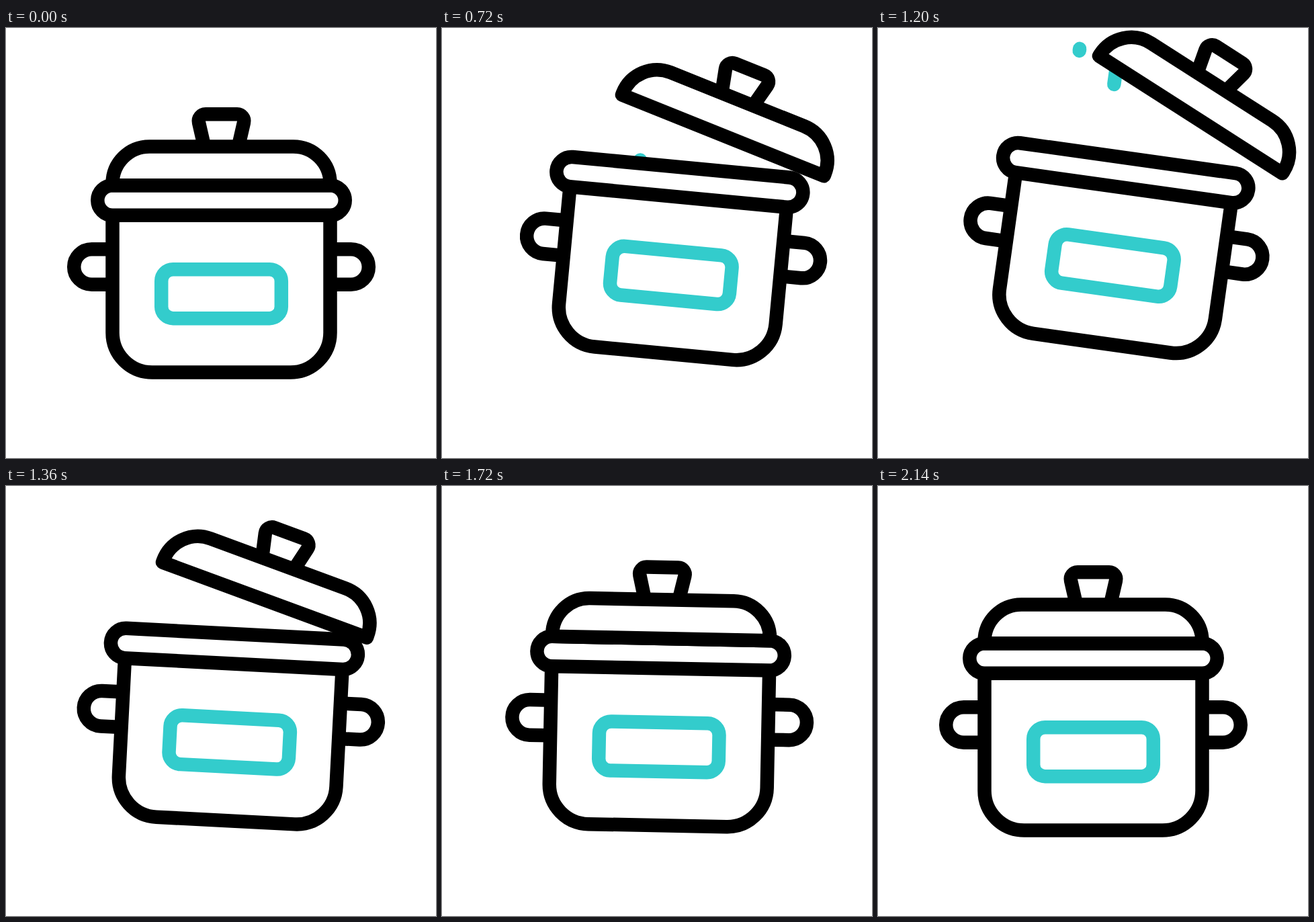
Recreate the animation shown at these times as an HTML page. Size 640x640 px, loop 2.26 s.

```html
<!DOCTYPE html>
<html lang="en">
<head>
<meta charset="utf-8">
<title>Cooking pot</title>
<style>
  html, body { margin: 0; width: 100%; height: 100%; overflow: hidden; background: #fff; }
  svg { display: block; width: 100vw; height: 100vh; }
  .line { fill: #fff; stroke: #000; stroke-width: 20.5; stroke-linejoin: round; }
  .teal { stroke: #3cc; }
  .steam { fill: none; stroke-linecap: round; }
</style>
</head>
<body>
<svg viewBox="0 0 640 640">
  <g id="pot">
    <path class="line teal steam" pathLength="1" d="M259 257V235C259 175 227 185 227 125V83"/>
    <path class="line teal steam" pathLength="1" d="M317 257V235C317 175 285 185 285 125V83"/>
    <path class="line" d="M158.5 329.2H127.5a26.3 26.3 0 0 0 0 52.6H158.5"/>
    <path class="line" d="M482.5 329.2H513.5a26.3 26.3 0 0 1 0 52.6H482.5"/>
    <path class="line" d="M158.5 279V453.5a59 59 0 0 0 59 59H423.5a59 59 0 0 0 59-59V279"/>
    <rect class="line" x="136.3" y="234.3" width="368.4" height="44.4" rx="22.2"/>
    <rect class="line teal" x="231.2" y="359.2" width="178.6" height="73" rx="17.5"/>
    <g id="lid">
      <path class="line" d="M295.2 176.5L287 140.8A10.25 10.25 0 0 1 297 128.3H344A10.25 10.25 0 0 1 354 140.8L345.8 176.5"/>
      <path class="line" d="M158.5 234.3V231.5a55 55 0 0 1 55-55H427.5a55 55 0 0 1 55 55V234.3Z"/>
    </g>
  </g>
</svg>
<script>
  const LOOP = 2260, STEP = 20;
  const pot = document.getElementById('pot');
  const lid = document.getElementById('lid');
  const steams = document.querySelectorAll('.steam');

  const progress = (t, from, to) => Math.min(1, Math.max(0, (t - from) / (to - from)));
  const smooth = x => x * x * (3 - 2 * x);

  // Quick departure with a long, soft arrival: cubic-bezier(.17, 0, .08, 1)
  function soften(x) {
    let low = 0, high = 1;
    for (let i = 0; i < 30; i++) {
      const s = (low + high) / 2, r = 1 - s;
      if (3 * r * r * s * 0.17 + 3 * r * s * s * 0.08 + s * s * s < x) low = s;
      else high = s;
    }
    return smooth(low);
  }

  // Each pose: time, angle, x, y, easing used to reach it
  const poses = [
    [200, 0, 0, 0, smooth],
    [430, -1.87, -5.3, 12.4, smooth],
    [1220, 7.97, 34.5, -41.8, soften],
    [1497, -1.87, -5.3, 12.4, smooth],
    [1816, 1.95, 5.5, -12.8, smooth],
    [2136, 0, 0, 0, smooth]
  ];

  function poseAt(t) {
    let next = poses.findIndex(p => p[0] > t);
    if (next === 0) next = 1;
    if (next < 0) next = poses.length - 1;
    const a = poses[next - 1], b = poses[next];
    const k = b[4](progress(t, a[0], b[0]));
    return [1, 2, 3].map(i => a[i] + (b[i] - a[i]) * k);
  }

  const openness = (t, opens, opened, closes, closed) =>
    t < closes ? soften(progress(t, opens, opened)) : 1 - smooth(progress(t, closes, closed));

  function draw(t) {
    const [angle, x, y] = poseAt(t);
    pot.setAttribute('transform',
      `translate(${320.5 + x} ${355.5 + y}) rotate(${angle}) translate(-320.5 -355.5)`);

    const shift = openness(t, 430, 1220, 1220, 1497);
    const tilt = openness(t, 474, 1260, 1260, 1535);
    lid.setAttribute('transform',
      `translate(${69.1 * shift} ${-9.5 * shift}) rotate(${24.7 * tilt} 482.5 234)`);

    steams.forEach((steam, i) => {
      const time = t - i * 75;
      const tip = smooth(progress(time, 646, 946));
      const tail = smooth(progress(time, 923, 1223));
      const length = tip - tail;
      steam.style.display = length > 0 ? '' : 'none';
      steam.setAttribute('stroke-dasharray', `${length} 9`);
      steam.setAttribute('stroke-dashoffset', -tail);
    });
  }

  const start = performance.now();
  function tick() {
    const t = (performance.now() - start) % LOOP;
    draw(Math.floor(t / STEP) * STEP);
    requestAnimationFrame(tick);
  }
  tick();
</script>
</body>
</html>
```
